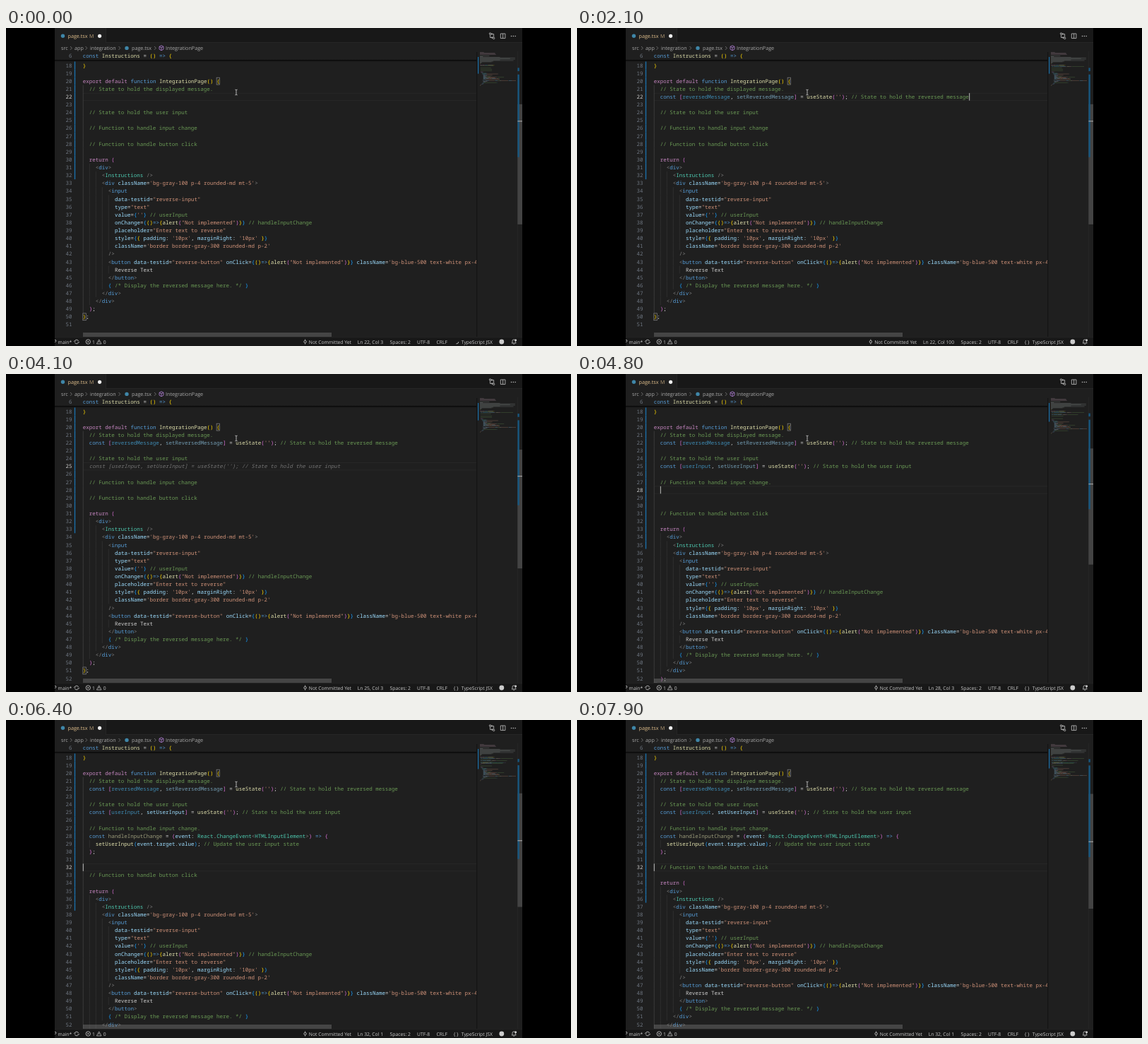
Animation of 800 by 450 pixels, one loop 8000 ms. Source, as an HTML page with a canvas:

```html
<!DOCTYPE html>
<html lang="en">
<head>
<meta charset="utf-8">
<title>Code editor</title>
<style>
html, body { margin: 0; width: 800px; height: 450px; overflow: hidden; background: #000; }
canvas { display: block; }
</style>
</head>
<body>
<canvas id="stage" width="800" height="450"></canvas>
<script>
const ctx = document.getElementById('stage').getContext('2d');
const LOOP = 8000, FIRST = 18, CHAR = 4.508, ROW = 11.12, LEFT = 108.8, ROW_Y = 52.9;
const VIEW_TOP = 33, VIEW_H = 404, RIGHT = 667;
const MONO = '500 7.513px "Noto Sans Mono", "DejaVu Sans Mono", monospace';
const SANS = '"Open Sans", "Noto Sans", sans-serif';
const BRACKETS = ['#ffd700', '#da70d6', '#179fff'];

const MESSAGE = "  const [reversedMessage, setReversedMessage] = useState(''); // State to hold the reversed message";
const INPUT = "  const [userInput, setUserInput] = useState(''); // State to hold the user input";
const HANDLER = [
  '  const handleInputChange = (event: React.ChangeEvent<HTMLInputElement>) => {',
  '    setUserInput(event.target.value); // Update the user input state',
  '  };'
];
const MARKUP = `  return (
    <div>
      <Instructions />
      <div className='bg-gray-100 p-4 rounded-md mt-5'>
        <input
          data-testid="reverse-input"
          type="text"
          value={''} // userInput
          onChange={()=>{alert("Not implemented")}} // handleInputChange
          placeholder="Enter text to reverse"
          style={{ padding: '10px', marginRight: '10px' }}
          className='border border-gray-300 rounded-md p-2'
        />
        <button data-testid="reverse-button" onClick={()=>{alert("Not implemented")}} className='bg-blue-500 text-white px-4 py-2'>
          Reverse Text
        </button>
        { /* Display the reversed message here. */ }
      </div>
    </div>
  );
};
`.split('\n');
// Lengths of the lines scrolled out of view, for the minimap
const ABOVE = [12, 45, 46, 48, 0, 28, 9, 60, 105, 90, 105, 60, 100, 40, 35, 6, 4];

// time, line, column (0 = end of line)
const MOVES = [
  [-500, 22, 3], [1100, 22, 0], [2300, 23, 1], [2500, 24, 0], [3500, 25, 3], [4300, 25, 0],
  [4500, 26, 1], [4600, 27, 0], [4700, 27, 0], [4800, 28, 3], [5700, 30, 0], [6000, 31, 1],
  [6200, 32, 1], [6800, 32, 1]
];
// start, end, line, text
const GHOSTS = [[500, 1100, 22, [MESSAGE]], [3900, 4300, 25, [INPUT]], [5200, 5700, 28, HANDLER]];
const BUSY = [[0, 500], [3600, 3900], [4900, 5500]];
const DIMMED = [
  [/^(set)?[rR]eversedMessage$/, 2100, LOOP], [/^userInput$/, 4700, LOOP],
  [/^setUserInput$/, 4700, 5900], [/^handleInputChange$/, 6100, LOOP]
];

const RULES = [
  [/\/\/.*|\/\*.*?\*\//, '#6a9955'],
  [/'[^']*'|"[^"]*"/, '#ce9178'],
  [/=>|\b(?:const|function)\b/, '#569cd6'],
  [/\b(?:export|default|return)\b/, '#c586c0'],
  [/<\/?|\/?>/, '#808080'],
  [/Reverse Text/, '#cccccc'],
  [/(?<=<\/?)[a-z]+/, '#569cd6'],
  [/(?<=<)[A-Z]\w*|React|ChangeEvent/, '#4ec9b0'],
  [/[\w-]+(?=\()|Instructions|handleInput\w+/, '#dcdcaa'],
  [/(?:reversedMessage|userInput)\b/, '#4fc1ff'],
  [/[\w-]+/, '#9cdcfe'],
  [/[^\s\w]/, '#d4d4d4']
];
const TOKEN = new RegExp(RULES.map(([re]) => `(${re.source})`).join('|'), 'g');

const within = (t, [from, to]) => t >= from && t < to;

function rect(x, y, w, h, color) {
  ctx.fillStyle = color;
  ctx.fillRect(x, y, w, h);
}

function disc(x, y, r, color) {
  ctx.fillStyle = color;
  ctx.beginPath();
  ctx.arc(x, y, r, 0, 7);
  ctx.fill();
}

function stroke(path, color, width = 0.8) {
  ctx.strokeStyle = color;
  ctx.lineWidth = width;
  ctx.stroke(new Path2D(path));
}

function ring(x, y, r, color, from = 0, to = 7) {
  ctx.strokeStyle = color;
  ctx.lineWidth = 0.8;
  ctx.beginPath();
  ctx.arc(x, y, r, from, to);
  ctx.stroke();
}

function text(str, x, y, color, font, align = 'left') {
  ctx.font = font;
  ctx.textAlign = align;
  ctx.fillStyle = color;
  ctx.fillText(str, x, y);
}

// Splits the lines into coloured tokens; bracket depth carries on from line to line
function tokenize(lines, depth) {
  return lines.map(line => [...line.matchAll(TOKEN)].map(m => {
    const str = m[0];
    let color = RULES[m.slice(1).findIndex(g => g !== undefined)][1];
    if ('([{'.includes(str)) color = BRACKETS[depth++ % 3];
    else if (')]}'.includes(str)) color = BRACKETS[--depth % 3];
    return { str, col: m.index, color };
  }));
}

function documentAt(t) {
  const lines = ['}', '', 'export default function IntegrationPage() {',
    '  // State to hold the displayed message.', t >= 1100 ? MESSAGE : '', '',
    '  // State to hold the user input'];
  if (t >= 3500) lines.push(t >= 4300 ? INPUT : '');
  lines.push('', '  // Function to handle input change' + (t >= 4700 ? '.' : ''));
  if (t >= 4800) lines.push(...(t >= 5700 ? HANDLER : ['']));
  if (within(t, [4800, 6800])) lines.push('');
  return lines.concat('', '  // Function to handle button click', '', MARKUP);
}

function indentAt(lines, i) {
  const next = lines.slice(i).find(s => s);
  return next ? next.search(/\S/) : 0;
}

function drawTokens(tokens, y, t) {
  for (const { str, col, color } of tokens) {
    const dim = DIMMED.some(([re, from, to]) => re.test(str) && within(t, [from, to]));
    ctx.globalAlpha = dim ? 0.65 : 1;
    text(str, LEFT + col * CHAR, y + 2.6, color, MONO);
  }
  ctx.globalAlpha = 1;
}

function drawCode(t, lines, tokens, cursor, ghost, changedTo) {
  const [moved, line, col] = cursor;
  ctx.save();
  ctx.beginPath();
  ctx.rect(69, 45, RIGHT - 69, 392);
  ctx.clip();
  let y = ROW_Y;
  lines.forEach((src, i) => {
    const n = FIRST + i, active = n === line, rows = ghost && active ? ghost[3] : [src];
    const top = y - ROW / 2, height = rows.length * ROW;
    if (active) {
      rect(LEFT, top, RIGHT - LEFT, 0.8, '#292929');
      rect(LEFT, top + ROW - 0.8, RIGHT - LEFT, 0.8, '#292929');
    }
    for (let c = 0; c < indentAt(lines, i); c += 2)
      rect(LEFT + c * CHAR, top, 0.7, height, c ? '#353535' : '#484848');
    if (n <= changedTo) rect(96.8, top, 1.4, ROW, '#1b6fa8');
    text(n, 93.6, y + 2.6, active ? '#cccccc' : '#6e7681', MONO, 'right');
    if (rows !== ghost?.[3]) drawTokens(tokens[i], y, t);
    else rows.forEach((s, k) => {
      const pad = s.search(/\S/);
      text(s.trim(), LEFT + pad * CHAR, y + k * ROW + 2.6, '#737373', 'italic ' + MONO);
    });
    const brace = n === 20 ? 42 : src === '};' ? 0 : -1;
    if (brace >= 0) {
      ctx.strokeStyle = '#888';
      ctx.lineWidth = 0.7;
      ctx.strokeRect(LEFT + brace * CHAR, top + 0.6, CHAR, ROW - 1.2);
    }
    if (active && (t - moved) % 1000 < 500)
      rect(LEFT + (col - 1) * CHAR, top + 0.3, 1.1, ROW - 0.6, '#aeafad');
    y += height;
  });
  rect(109, 431, 352, 6.5, 'rgba(121,121,121,.42)');
  ctx.restore();

  // Sticky scope line and its shadow
  text(6, 93.6, 42.2, '#6e7681', MONO, 'right');
  drawTokens(tokenize(['const Instructions = () => {'], 0)[0], 39.6, t);
  const shade = ctx.createLinearGradient(0, 45, 0, 48);
  shade.addColorStop(0, '#000c');
  shade.addColorStop(1, '#0000');
  rect(69, 45, RIGHT - 69, 3, shade);
  rect(RIGHT - 1, 34, 1.2, 403, '#151515');
}

function drawMap(lines, tokens, line, extraRows, changedTo) {
  const mapY = n => 34.3 + (n - 1) * 0.95, unit = 0.475;
  ctx.globalAlpha = 0.42;
  ABOVE.forEach((len, i) => rect(671, mapY(i + 1), len * unit, 0.6, i < 4 ? '#a98a9a' : '#a0aaa8'));
  tokens.forEach((row, i) => row.forEach(({ str, col, color }) => {
    const x = 671 + col * unit;
    if (x < 722) rect(x, mapY(FIRST + i), Math.min(str.length * unit, 722 - x), 0.6, color);
  }));
  ctx.globalAlpha = 1;
  rect(668, mapY(8), 1.2, mapY(changedTo + 1) - mapY(8), '#1b6fa8');

  const total = FIRST - 1 + lines.length + extraRows + VIEW_H / ROW - 1;
  const rulerY = n => VIEW_TOP + n * VIEW_H / total;
  rect(724, VIEW_TOP, 0.6, VIEW_H, '#2b2b2b');
  rect(724.4, rulerY(16), 6.6, VIEW_H * VIEW_H / ROW / total, 'rgba(121,121,121,.4)');
  for (const [from, to] of [[5, 6], [7, changedTo + extraRows]])
    rect(724.4, rulerY(from), 2.4, rulerY(to) - rulerY(from), '#17567f');
  rect(724.4, rulerY(line - 1), 6.6, 1.2, '#a0a0a0');
}

function drawTop() {
  rect(69, 0, 662, 450, '#1f1f1f');
  rect(69, 0, 662, 20.5, '#181818');
  rect(141, 20, 590, 0.7, '#2b2b2b');
  rect(69, 0, 72, 21, '#1f1f1f');
  rect(141, 0, 0.7, 20.5, '#2b2b2b');
  disc(80.5, 11.3, 2.7, '#3f86a8');
  text('page.tsx', 87.5, 13.9, '#e2c08d', '7.2px ' + SANS);
  text('M', 118, 13.9, '#b89e76', '7px ' + SANS);
  disc(132.6, 11.3, 2.6, '#f0f0f0');

  const crumbs = [['src', 78], ['app', 97], ['integration', 119], ['page.tsx', 178], ['IntegrationPage', 226]];
  crumbs.forEach(([str, x]) => text(str, x, 30.9, '#a9a9a9', '7.2px ' + SANS));
  [91, 112.5, 159.5, 210].forEach(x => stroke(`M${x} 26l2.3 2.4l-2.3 2.4`, '#8a8a8a', 0.7));
  disc(171, 28.4, 2.7, '#3f86a8');
  stroke('M220 24.8l3 1.6v3.7l-3 1.7l-3-1.7v-3.7zM217 26.4l3 1.5l3-1.5M220 28v3.6', '#b180d7');

  const icon = '#c5c5c5';
  stroke('M685.5 9v4.5h3.5M687.7 12l1.5 1.5l-1.5 1.5M690.6 13.2v-4.6h-3.4M688.5 7.1l-1.5 1.5l1.5 1.5', icon);
  ring(685.5, 8, 1.2, icon);
  ring(690.6, 14.5, 1.2, icon);
  stroke('M700.3 8h6.6v6.6h-6.6zM703.6 8v6.6', icon);
  [715.5, 718.3, 721.1].forEach(x => disc(x, 11.4, 0.75, icon));
}

function drawStatus(t, line, col) {
  const color = '#cccccc', font = '6.75px ' + SANS;
  const put = (str, x, align) => text(str, x, 446.5, color, font, align);
  rect(69, 437.5, 662, 12.5, '#181818');
  rect(69, 437.5, 662, 0.6, '#2b2b2b');
  stroke('M69 441.2q2.6 .2 1.8 2.2q-.6 1-1.8 1', color);
  put('main*', 73.6);
  ring(100, 444, 2.8, color, 0.4, 2.9);
  ring(100, 444, 2.8, color, 3.5, 6);
  stroke('M96 444l1.3-1.4l1.4 1.4M101.3 444l1.4 1.4l1.3-1.4', color, 0.7);
  ring(116.3, 444, 3.2, color);
  stroke('M115 442.7l2.6 2.6m0-2.6l-2.6 2.6', color, 0.7);
  put('1', 122);
  stroke('M131.7 440.9l3.3 6h-6.6zM131.7 443v2', color, 0.7);
  put('0', 137.8);

  const place = `Ln ${line}, Col ${col}`;
  put(place, 534, 'right');
  const right = 534 - ctx.measureText(place).width - 9;
  put('Not Committed Yet', right, 'right');
  const x = right - ctx.measureText('Not Committed Yet').width - 5.3;
  ring(x, 444, 1.7, color);
  stroke(`M${x} 440.5v1.8m0 3.4v1.8`, color);

  put('Spaces: 2', 543.6);
  put('UTF-8', 582);
  put('CRLF', 609.6);
  if (BUSY.some(span => within(t, span))) {
    const a = t / 1000 * Math.PI * 2;
    ring(638, 444, 2.8, color, a, a + 1.8);
  } else put('{ }', 633.8);
  put('TypeScript JSX', 644.8);
  disc(701.8, 444, 3.4, '#cccccc');
  stroke('M716.2 446h6l-.8-1.3v-1.9q0-1.9-2.2-1.9t-2.2 1.9v1.9zM718.4 447.2h1.6', color);
  disc(721.6, 441.7, 1.5, color);
}

function draw(now) {
  const t = now % LOOP;
  const lines = documentAt(t), tokens = tokenize(lines, 1);
  const [moved, line, column] = MOVES.findLast(m => m[0] <= t);
  const col = column || lines[line - FIRST].length + 1;
  const ghost = GHOSTS.find(g => within(t, g));
  const extraRows = ghost ? ghost[3].length - 1 : 0;
  const changedTo = FIRST + lines.findIndex(s => s.includes('<Instructions'));
  ctx.textRendering = 'geometricPrecision';
  rect(0, 0, 800, 450, '#000');
  drawTop();
  drawCode(t, lines, tokens, [moved, line, col], ghost, changedTo);
  drawMap(lines, tokens, line, extraRows, changedTo);
  drawStatus(t, line, col);
  stroke('M324.4 87.2q1.6 0 1.6 .8q0-.8 1.6-.8M326 88v6M324.4 94.8q1.6 0 1.6-.8q0 .8 1.6 .8', '#d8d8d8');
}

const start = performance.now();
function tick() {
  draw(performance.now() - start);
  requestAnimationFrame(tick);
}
tick();
</script>
</body>
</html>
```
